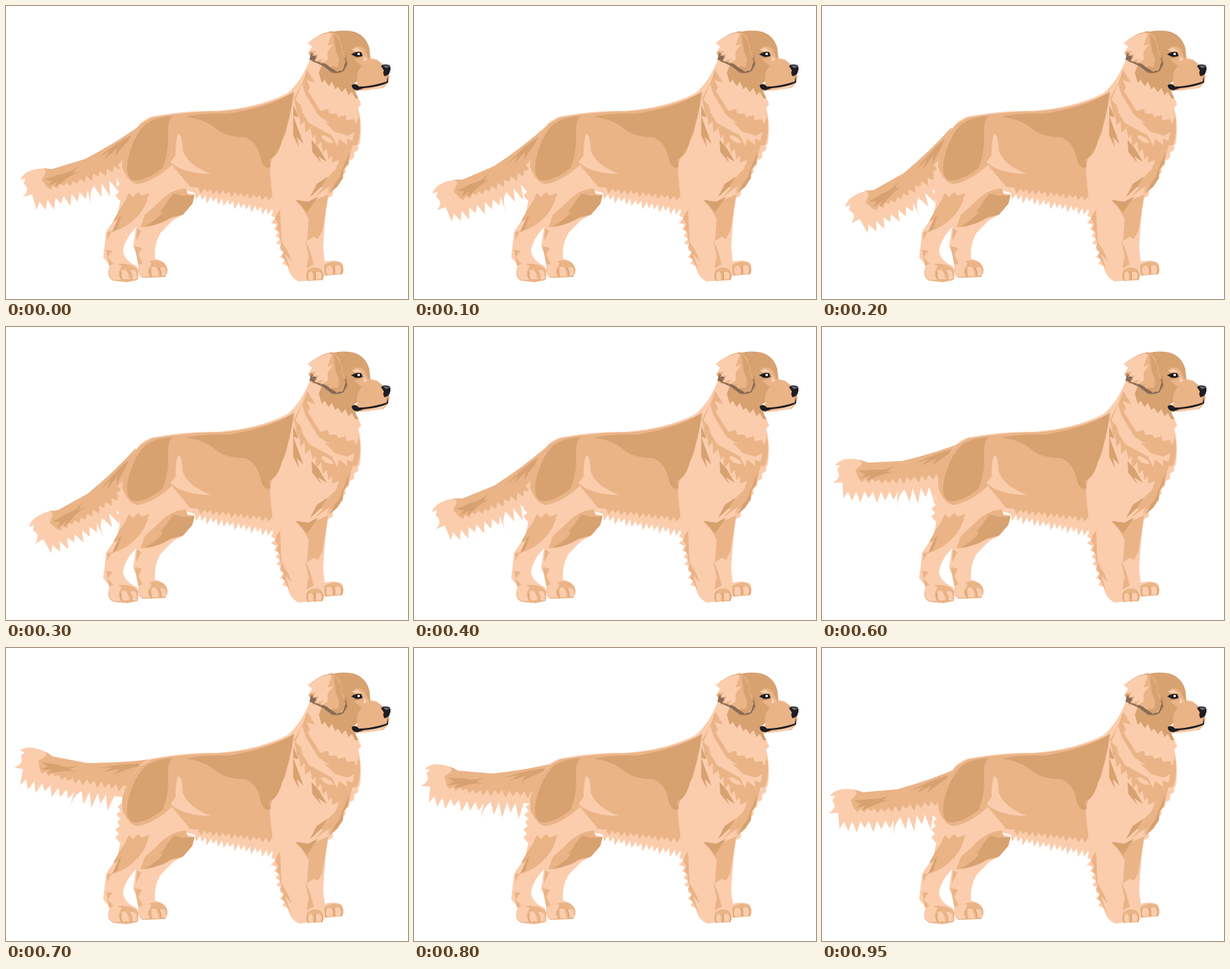
Animation of 550x400 px, one loop 1 s. Source, as an HTML page:

```html
<!DOCTYPE html>
<html lang="en">
<head>
<meta charset="utf-8">
<title>Dog wagging its tail</title>
<style>
html, body { margin: 0; width: 100%; height: 100%; overflow: hidden; background: #fff; }
svg { display: block; width: 100%; height: 100%; }
.light { fill: #fbcdad; }
.mid { fill: #eab487; }
.dark { fill: #d7a170; }
.shade { fill: #8a6c55; }
.ink { fill: #1e1d22; }
.gloss { fill: #62626c; }
.white { fill: #fff; }
.line { fill: none; stroke: #d7a170; stroke-width: 1.3; stroke-linecap: round; }
</style>
</head>
<body>
<svg viewBox="0 0 550 400"><g id="tail"></g><g id="dog"></g></svg>
<script>
const tail = document.getElementById("tail"), dog = document.getElementById("dog");

function add(group, tone, d) {
  const path = document.createElementNS("http://www.w3.org/2000/svg", "path");
  path.setAttribute("class", tone);
  path.setAttribute("d", d);
  group.append(path);
}

// A row of n tufts of height h from one point to another
function fur(x1, y1, x2, y2, n, h, lean = 0) {
  const dx = x2 - x1, dy = y2 - y1, len = Math.hypot(dx, dy);
  let d = `L${x1} ${y1}`;
  for (let i = 0; i < n; i++) {
    const p = (i + 0.5) / n, q = (i + 1) / n;
    const out = h * (1 + 0.25 * Math.sin(i * 2.4)) / len, along = p + lean / len;
    d += `L${x1 + dx * along + dy * out} ${y1 + dy * along - dx * out}L${x1 + dx * q} ${y1 + dy * q}`;
  }
  return d;
}

// The tail is drawn level, with its joint at 103,193
add(tail, "light", `M186 164Q150 180 103 193L56 197Q38 190 22 194 14 197 11 202L18 202 14 208Q22 218 9 226L22 225 24 247
  ${fur(30, 237, 98, 235, 6, -13)}L98 258Q98 240 107 232 ${fur(107, 231, 152, 226, 4, -18)}L175 222Z`);
add(tail, "mid", `M188 163Q150 180 103 193L56 197 44 193Q50 198 45 202L39 208 ${fur(44, 219, 90, 219, 5, -5)}
  ${fur(90, 217, 160, 208, 7, -8)}L180 212Z`);
add(tail, "dark", "M43 208Q55 208 63 206 80 208 92 200L83 208 93 208Q78 211 70 215L54 222 60 215 45 219 53 213Z");
add(tail, "dark", "M172 174Q150 180 119 196L139 189 128 199 149 188 144 198Q160 183 175 177Z");

const body = (tone, d) => add(dog, tone, d);

// Torso and neck
body("light", `M200 151Q240 143 290 143 345 139 385 119 405 102 416 72L470 70 478 117 486 134 482 139Q488 162 484 188
  ${fur(482, 190, 441, 262, 7, 3)}L390 290 366 282 ${fur(364, 277, 258, 255, 14, 9)}L240 250 200 270 158 267
  ${fur(154, 264, 158, 212, 5, 5)}Q164 182 184 160 192 153 200 151Z`);
// Front legs
body("light", `M441 258Q436 290 434 330L436 349Q452 345 460 351 464 360 460 366L436 368 433 374 400 376Q389 370 386 358
  ${fur(385, 355, 366, 280, 8, 6)}Z`);
// Hind legs
body("light", `M257 257L255 270 242 285 229 292 212 309Q202 325 204 345 220 348 221 364 218 371 186 371 178 365 182 348
  L174 328 178 302Q163 317 160 334 162 348 179 355 183 368 180 374 166 377 147 375 136 368 142 354L133 343 137 308 152 286 157 264 185 243Z`);

// Back, flank and belly
body("mid", `M200 152Q245 144 290 144 350 140 391 119 396 122 382 176 361 207 361 225L365 265
  ${fur(364, 260, 263, 248, 12, 6)}L252 247 227 217Q203 239 181 243 168 243 159 220L159 205Q165 181 184 161Z`);
body("dark", "M228 150Q205 151 190 162 172 181 166 214 164 233 173 238 192 239 214 221 222 204 222 178 220 157 228 150Z");
body("dark", `M245 151Q270 146 303 147 360 139 394 117 391 145 377 186 371 207 360 209L362 220Q352 224 348 207 344 186 327 179
  298 179 284 165 267 153 245 151Z`);
body("light", "M236 175Q232 181 232 204L225 213Q242 229 280 229 250 218 242 198 241 176 236 175Z");

// Hind leg shading
body("mid", "M246 249Q225 250 207 270L190 285 184 302Q200 303 213 293 232 283 252 266Z");
body("dark", "M258 258L255 270 242 285 226 289Q208 300 190 301 210 290 215 280L211 281 229 256 241 259Z");
body("mid", "M168 255L173 261 181 254 186 259 196 255Q191 276 180 287 164 304 146 308L155 290 147 294 163 266Z");
body("dark", "M162 267L148 294 158 285 152 304 145 309 154 289 147 293Z");
body("mid", "M138 309L145 307 139 319ZM137 333L146 334 139 343 147 352 141 355ZM179 304L185 307 178 321ZM176 328L186 330 181 340 187 351 181 354Z");

// Paws
body("mid", "M141 359Q151 350 163 352 177 354 181 361L180 374 166 377 147 375Q137 370 141 359Z");
body("mid", "M183 357Q193 347 205 347 219 348 221 360L218 370 187 371Q179 365 183 357Z");
body("light", "M142 356Q151 350 158 355L154 364 159 374 147 374Q137 368 142 356ZM158 361Q166 356 169 373L159 373ZM170 361Q180 357 179 373L171 373Z");
body("light", "M184 354Q193 346 199 351L195 360 198 369 187 370Q179 365 184 354ZM199 357Q208 352 209 369L200 369ZM211 357Q221 354 218 368L212 368Z");
body("line", "M157 364Q154 369 159 374M169 363Q173 366 172 373M196 359Q194 365 199 369M209 358Q213 362 212 368");
body("mid", "M412 361Q421 354 431 359L434 366 433 374 414 375ZM435 354Q445 347 457 350 463 357 460 366L437 368Z");
body("light", "M414 364Q421 360 420 374L414 374ZM424 364Q435 360 431 373L424 373ZM437 357Q448 349 447 366L438 367ZM450 355Q462 351 458 365L451 366Z");
body("line", "M413 363Q410 370 414 375M422 363Q425 369 422 374M431 362Q434 367 432 374M438 357Q435 363 439 367M448 355Q451 361 448 366M458 354Q461 361 458 366");

// Front leg shading
body("mid", "M399 264L414 269 441 257Q436 286 433 306L427 318 421 315 412 321 414 290Z");
body("dark", "M396 265L414 267 427 260 412 282ZM441 257L462 222 461 235 453 247Z");
body("mid", "M409 318L416 334 421 353 411 358 414 341Z");
body("mid", `M375 278L377 324 389 361 ${fur(382, 348, 370, 285, 5, 3)}Z`);
body("mid", "M375 318L386 336 391 349 381 338Z");

// Chest and ruff
body("mid", `M394 126L399 151 ${fur(401, 148, 446, 204, 6, -8, 7)}L446 214 456 210 451 223 426 247 434 248 423 260 443 246 439 256
  455 236 470 207 474 190 480 190Q487 172 483 150L479 161 ${fur(478, 160, 430, 143, 4, -5, -3)}L413 116 416 111 411 101 423 105 412 87 406 104Z`);
body("light", "M405 106L410 121 427 149 443 160 436 158 450 172 467 177 477 172 474 184 466 181 467 190 456 181 453 191 446 177 415 160 406 146 403 135 396 128Z");
body("light", "M434 176Q446 180 448 187 437 188 431 178Z");
body("dark", "M393 135L400 152 393 150 407 188 398 179 401 193 393 177ZM418 183L428 194 439 213 427 205 432 215 419 199Z");
body("dark", "M470 200L468 215 457 230ZM425 243L440 233 431 247 416 261Z");

// Head
body("dark", `M440 38Q456 31 476 35 492 40 497 57L499 75 487 98 476 106 478 117 482 126
  ${fur(478, 126, 432, 105, 5, -6, 3)}L428 91 433 78 420 77 414 64Z`);
body("mid", "M476 56Q488 53 492 62L496 71 507 73 516 80 525 96 522 106 516 112 478 116 472 112 481 105Q478 90 487 82L476 73 488 70Z");
body("light", "M481 116Q500 112 519 107L516 111 497 115ZM473 59L481 57 487 62 477 62ZM490 68L495 73 489 76Z");
body("mid", "M484 86Q494 76 515 82L523 95 521 103 484 110Q477 98 484 86Z");
body("shade", "M418 64L415 73 434 82 446 91Q462 94 467 82L466 67 459 80 438 80Z");
body("mid", "M446 34Q426 38 413 51L419 55 416 62 426 67 422 75 438 79Q449 90 460 88 467 77 460 58 458 39 446 34Z");
body("light", "M446 36Q426 38 413 51L419 55 415 62 424 61 419 68 428 66 423 75 434 72 430 79 440 73 440 62 448 52 440 54Z");
body("dark", "M448 37Q458 44 458 59L465 76 460 86 453 90 444 83 454 83 456 73 451 60Z");
body("line", "M443 36Q455 35 458 46L458 57 464 66 468 79 463 88");
body("ink", "M472 66Q479 61 486 63L488 68Q480 71 476 68Z");
body("white", "M481 64H484V67H481Z");
body("ink", "M513 82Q517 78 525 81 528 87 523 94L518 96Q515 92 517 88Z");
body("gloss", "M516 82Q521 79 525 83L520 85Z");
body("ink", "M473 108Q478 104 483 110 501 110 521 103L522 95 523 104Q514 110 490 112L481 115Q473 115 473 108Z");

// time in ms, joint x and y, angle in degrees
const keys = [
  [0, 108, 209, -12], [250, 113, 233, -27.5], [550, 107, 200, -7],
  [600, 110, 183, 2], [700, 110, 157, 16], [950, 103, 193, 0]
];

function poseAt(t) {
  const i = Math.max(1, keys.findIndex(k => k[0] >= t));
  const a = keys[i - 1], b = keys[i];
  const p = (t - a[0]) / (b[0] - a[0]);
  return a.map((v, j) => v + (b[j] - v) * p);
}

function draw(now) {
  const t = Math.floor(now % 1000 / 50) * 50;
  const [, x, y, angle] = poseAt(t);
  tail.setAttribute("transform", `translate(${x} ${y}) rotate(${angle}) translate(-103 -193)`);
  requestAnimationFrame(draw);
}
draw(performance.now());
</script>
</body>
</html>
```
